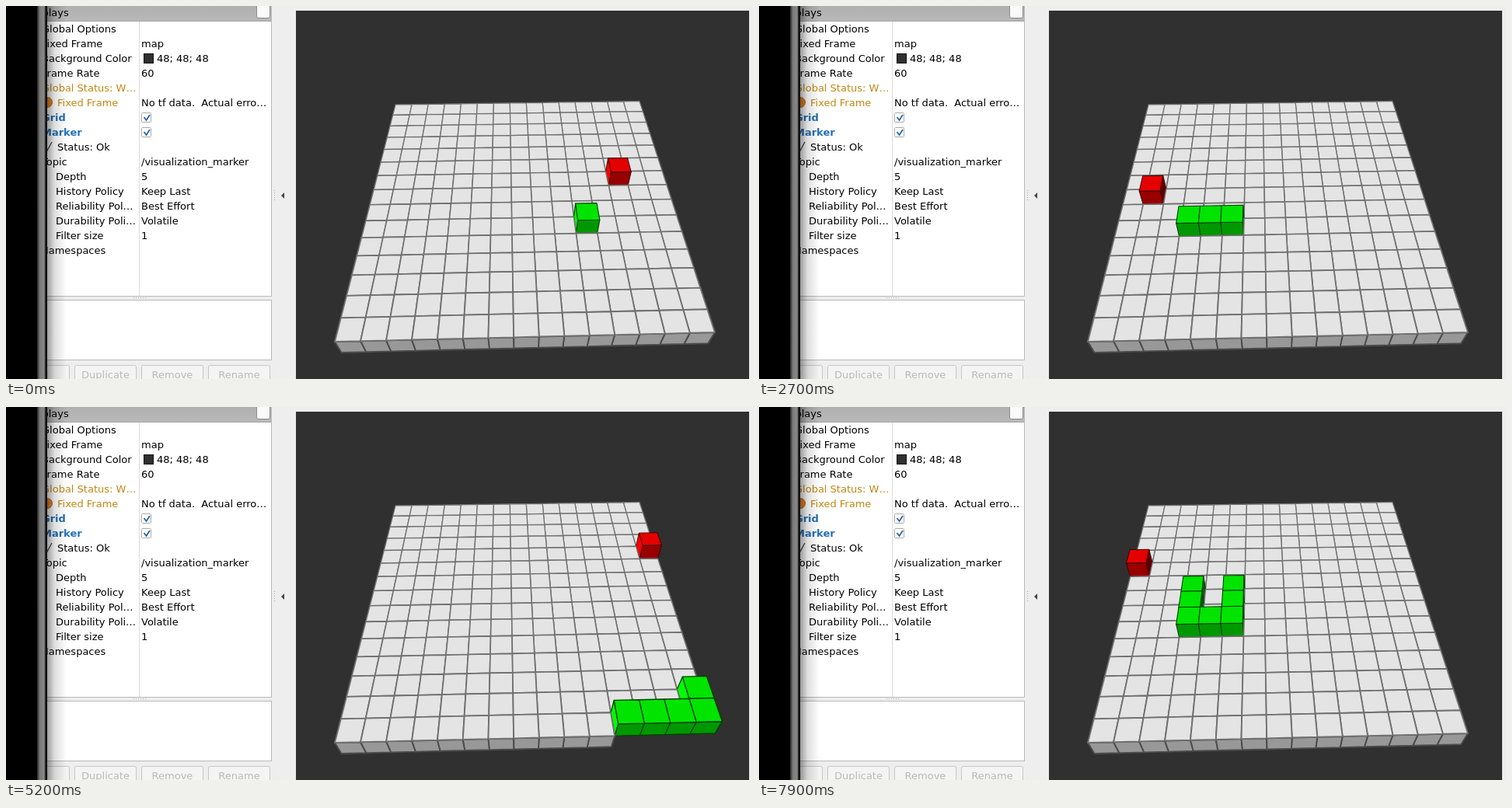
Recreate the animation shown at these times as an HTML page with a canvas. Size 961 by 480 pixels, loop 8000 ms.

```html
<!DOCTYPE html>
<html lang="en">
<head>
<meta charset="utf-8">
<title>Snake on a marker grid</title>
<style>
  html, body { margin: 0; width: 100%; height: 100%; overflow: hidden; background: #eee; }
  svg, canvas { position: absolute; left: 0; top: 0; display: block; }
  text { font: 13px "DejaVu Sans", Verdana, sans-serif; white-space: pre; }
  .warn { fill: #c08712; }
  .link { fill: #2470b5; font-weight: bold; }
  .off { fill: #bababa; text-anchor: middle; }
  .box { fill: #fff; stroke: #b9b9b9; }
  .btn { fill: #f4f4f4; stroke: #c6c6c6; }
</style>
</head>
<body>
<svg width="961" height="480" viewBox="0 0 961 480">
  <defs>
    <linearGradient id="head" x2="0" y2="1">
      <stop offset="0" stop-color="#b0b0b0"/><stop offset="1" stop-color="#b9b9b9"/>
    </linearGradient>
    <linearGradient id="shadow">
      <stop offset="0" stop-opacity=".42"/><stop offset=".4" stop-opacity=".13"/><stop offset="1" stop-opacity="0"/>
    </linearGradient>
    <linearGradient id="edge">
      <stop offset="0" stop-color="#222"/><stop offset=".25" stop-color="#777"/>
      <stop offset=".7" stop-color="#8a8a8a"/><stop offset=".85" stop-color="#111"/><stop offset="1" stop-color="#111"/>
    </linearGradient>
  </defs>
  <rect width="961" height="480" fill="#eee"/>
  <rect class="box" x="20.5" y="-5.5" width="321" height="379"/>
  <rect x="20" width="321" height="19.5" fill="url(#head)"/>
  <path d="M20 19.5H341" stroke="#a4a4a4"/>
  <text x="26" y="13">Displays</text>
  <rect x="322.5" y="-3.5" width="17" height="19" rx="2.5" fill="#fafafa" stroke="#8c8c8c"/>
  <path d="M171.5 20V373" stroke="#dcdcdc"/>
  <g id="rows"></g>
  <rect x="177.500" y="61.500" width="12" height="12" fill="#303030" stroke="#111"/>
  <circle cx="53" cy="124" r="6.500" fill="#e8862a" stroke="#c8640f"/>
  <path d="M50 182l3 4 6-11" fill="none" stroke="#444" stroke-width="1.300"/>
  <g id="checks"></g>
  <path d="M164 375.500h18" stroke="#aaa" stroke-dasharray="1 2"/>
  <rect class="box" x="20.500" y="378.500" width="321" height="77"/>
  <g id="buttons"></g>
  <path d="M345.500 237v14" stroke="#aaa" stroke-dasharray="1 2"/>
  <path d="M358 240v8l-4-4z" fill="#444"/>
  <rect x="52" width="26" height="480" fill="url(#shadow)"/>
  <rect width="41" height="480"/>
  <rect x="40" width="13" height="480" fill="url(#edge)"/>
</svg>
<canvas id="view" width="961" height="480"></canvas>
<script>
// Side panel
const ROWS = [
  [46, "Global Options"], [46, "Fixed Frame", "map"], [46, "Background Color", "48; 48; 48", 194],
  [46, "Frame Rate", "60"], [46, "Global Status: W…", "", 0, "warn"],
  [66, "Fixed Frame", "No tf data.  Actual erro…", 174, "warn"],
  [46, "Grid", "", 0, "link"], [46, "Marker", "", 0, "link"], [66, "Status: Ok"],
  [46, "Topic", "/visualization_marker"], [64, "Depth", "5"], [64, "History Policy", "Keep Last"],
  [64, "Reliability Pol…", "Best Effort"], [64, "Durability Poli…", "Volatile"],
  [64, "Filter size", "1"], [45, "Namespaces"]
];
const fill = (id, html) => document.getElementById(id).innerHTML = html;

fill("rows", ROWS.map(([x, name, value = "", vx = 174, cls = ""], i) => {
  const y = 34 + 19 * i;
  return `<text class="${cls}" x="${x}" y="${y}">${name}</text><text x="${vx}" y="${y}">${value}</text>`;
}).join(""));
fill("checks", [137, 156].map(y =>
  `<rect x="174.5" y="${y}.5" width="12" height="12" rx="1" fill="#fff" stroke="#aaa"/>
   <path d="M177.500 ${y + 6}l3 4 4.500-7" fill="none" stroke="#2a64a0" stroke-width="1.800"/>`).join(""));
fill("buttons", ["", "Duplicate", "Remove", "Rename"].map((label, i) =>
  `<rect class="btn" x="${2.5 + 86 * i}" y="462.500" width="79" height="24" rx="2"/>
   <text class="off" x="${42 + 86 * i}" y="479">${label}</text>`).join("") +
  '<text x="29" y="479">Add</text>');

// Board: perspective of a 15 x 15 field, x right, y away, z up
const N = 15, LOOP = 8000;
const ctx = document.getElementById("view").getContext("2d");
const depth = (x, y, z) => 1 + 0.001113 * x + 0.0375 * y - 0.037 * z;
function project(x, y, z) {
  const w = depth(x, y, z);
  return [(423 + 33.61 * x + 23.99 * y - 24.5 * z) / w, (432 - 0.333 * x - 15.573 * y - 30.5 * z) / w];
}

const WHITE = [1, 1, 1], GREEN = [0, 1, 0], RED = [1, 0, 0];
const shade = (color, level) => `rgb(${color.map(c => c * level)})`;

function face(points, color, level, line, width) {
  const p = points.map(v => project(...v));
  let area = 0;
  p.forEach(([x, y], i) => {
    const [u, v] = p[(i + 1) % 4];
    area += x * v - u * y;
  });
  if (area <= 0) return;
  ctx.beginPath();
  p.forEach(v => ctx.lineTo(...v));
  ctx.closePath();
  ctx.fillStyle = shade(color, level);
  ctx.fill();
  ctx.strokeStyle = shade(color, line);
  ctx.lineWidth = width;
  ctx.stroke();
}

function block(x, y, color) {
  const tile = color === WHITE, b = tile ? -1 : 0, t = b + 1;
  const X = x + 1, Y = y + 1;
  const line = tile ? 75 : 65, width = (tile ? 1.9 : 1.3) / depth(x, y, t);
  face([[x, Y, t], [x, y, t], [x, y, b], [x, Y, b]], color, 255, line, width);
  face([[X, y, t], [X, Y, t], [X, Y, b], [X, y, b]], color, 95, line, width);
  face([[x, y, t], [X, y, t], [X, y, b], [x, y, b]], color, 152, line, width);
  face([[x, Y, t], [X, Y, t], [X, y, t], [x, y, t]], color, 228, tile ? 112 : 65, width);
}

// Snake route through its turning points
const TURNS = [[10, 5], [7, 5], [7, 9], [12, 9], [12, 7], [11, 7], [11, 5], [0, 5], [0, 6], [1, 6],
  [1, 5], [5, 5], [5, 8], [1, 8], [1, 6], [14, 6], [14, 0], [10, 0], [10, 10], [14, 10],
  [14, 8], [3, 8], [3, 5], [5, 5], [5, 7]];
const path = [TURNS[0]];
for (const [tx, ty] of TURNS.slice(1)) {
  let [x, y] = path[path.length - 1];
  while (x !== tx || y !== ty) {
    x += Math.sign(tx - x);
    y += Math.sign(ty - y);
    path.push([x, y]);
  }
}

// Food cell and the step at which it is eaten
const FOOD = [[12, 8, 13], [0, 5, 28], [1, 7, 43], [14, 1, 62], [14, 10, 81], [4, 8, 93], [0, 9, 999]];
// Time in ms and step reached
const PACE = [[0, 0], [100, 0], [1000, 12], [1100, 14], [2700, 35], [3800, 49], [4600, 59], [5200, 66],
  [5500, 70], [5900, 76], [6000, 76], [7000, 89], [7800, 99], [7900, 101], [8000, 101]];

function stepAt(time) {
  const t = Math.floor(time / 100) * 100;
  const i = PACE.findIndex(([end]) => end > t);
  const [t0, s0] = PACE[i - 1], [t1, s1] = PACE[i];
  return Math.round(s0 + (s1 - s0) * (t - t0) / (t1 - t0));
}

function draw(step) {
  const eaten = FOOD.filter(f => step > f[2]).length;
  const cells = new Map();
  const put = ([x, y], color) => cells.set(y * N + x, color);
  put(FOOD[eaten], RED);
  path.slice(Math.max(0, step - eaten), step + 1).forEach(c => put(c, GREEN));

  ctx.fillStyle = "#303030";
  ctx.fillRect(373, 6, 583, 474);
  ctx.lineJoin = "round";
  // Far rows first, and in each row from the sides to the middle
  for (let y = N - 1; y >= 0; y--) {
    for (let d = 7; d >= 0; d--) {
      for (const x of d ? [7 - d, 7 + d] : [7]) block(x, y, cells.get(y * N + x) || WHITE);
    }
  }
}

const start = performance.now();
let shown = -1;
function tick() {
  const step = stepAt((performance.now() - start) % LOOP);
  if (step !== shown) draw(shown = step);
  requestAnimationFrame(tick);
}
tick();
</script>
</body>
</html>
```
